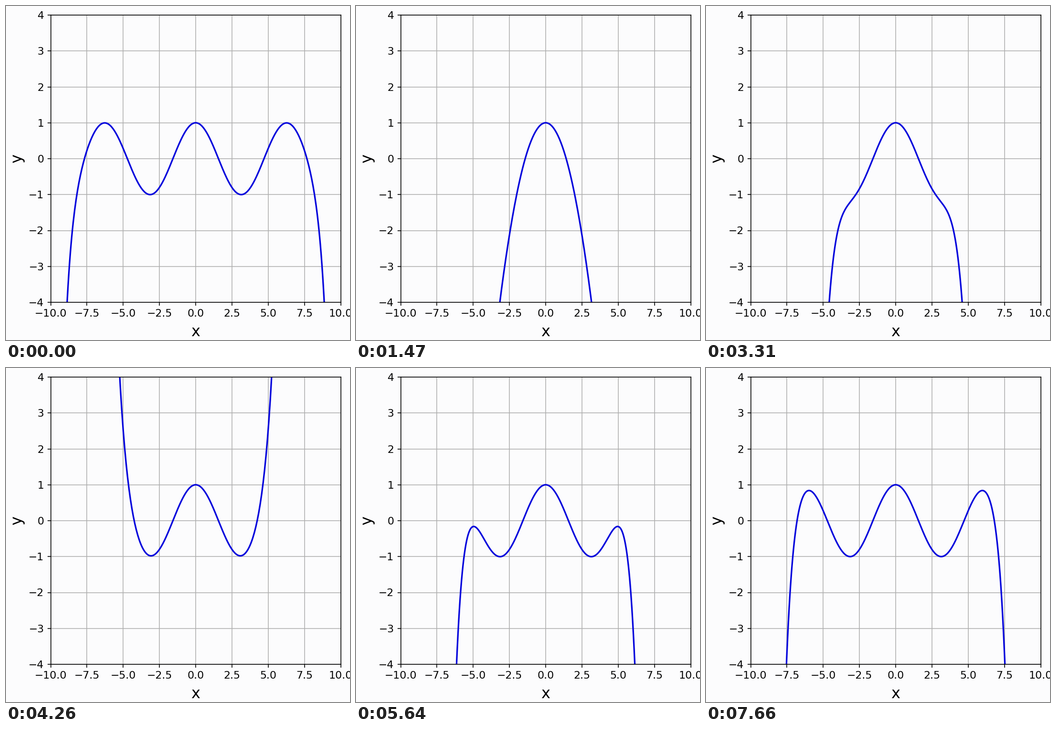
Recreate the animation shown at these times as a matplotlib script. Size 720x700 px, loop 8000 ms.

```python
import math

import matplotlib.pyplot as plt
import numpy as np
from matplotlib.animation import FuncAnimation

W, H, DPI = 720, 700, 144
LEFT, RIGHT, TOP, BOTTOM = 93.5, 700.5, 19, 621
LOOP_MS, STEP_MS = 8000, 50

# Times at which the next Taylor polynomial of cos(x) replaces the current one
SWITCH_MS = [250, 1250, 2250, 3200, 4250, 5200, 6250, 7250]
LAST_ORDER = 9  # highest power is twice the order

PAPER = "#fcfcfd"
CURVE = "#0404dc"
GRID = "#b0b0b0"

x = np.linspace(-10, 10, 401)


def cos_series(order):
    return sum((-1) ** k * x ** (2 * k) / math.factorial(2 * k)
               for k in range(order + 1))


def order_at(ms):
    passed = sum(ms >= t for t in SWITCH_MS)
    return passed - 1 if passed else LAST_ORDER


fig = plt.figure(figsize=(W / DPI, H / DPI), dpi=DPI, facecolor=PAPER)
ax = fig.add_axes([LEFT / W, 1 - BOTTOM / H,
                   (RIGHT - LEFT) / W, (BOTTOM - TOP) / H], facecolor=PAPER)
ax.set_xlim(-10, 10)
ax.set_ylim(-4, 4)
ax.set_xticks(np.arange(-10, 10.1, 2.5))
ax.set_yticks(range(-4, 5))
ax.tick_params(labelsize=11)
ax.grid(True, color=GRID, linewidth=0.8)

label = dict(fontsize=16, ha="center", va="baseline", rotation_mode="anchor")
fig.text((LEFT + RIGHT) / 2 / W, 1 - 691.5 / H, "x", **label)
fig.text(32.5 / W, 1 - (TOP + BOTTOM) / 2 / H, "y", rotation=90, **label)

curve, = ax.plot(x, cos_series(LAST_ORDER), color=CURVE, linewidth=1.65)


def update(frame):
    curve.set_ydata(cos_series(order_at(frame * STEP_MS)))
    return curve,


anim = FuncAnimation(fig, update, frames=LOOP_MS // STEP_MS,
                     interval=STEP_MS, repeat=True, repeat_delay=0)
plt.show()
```
